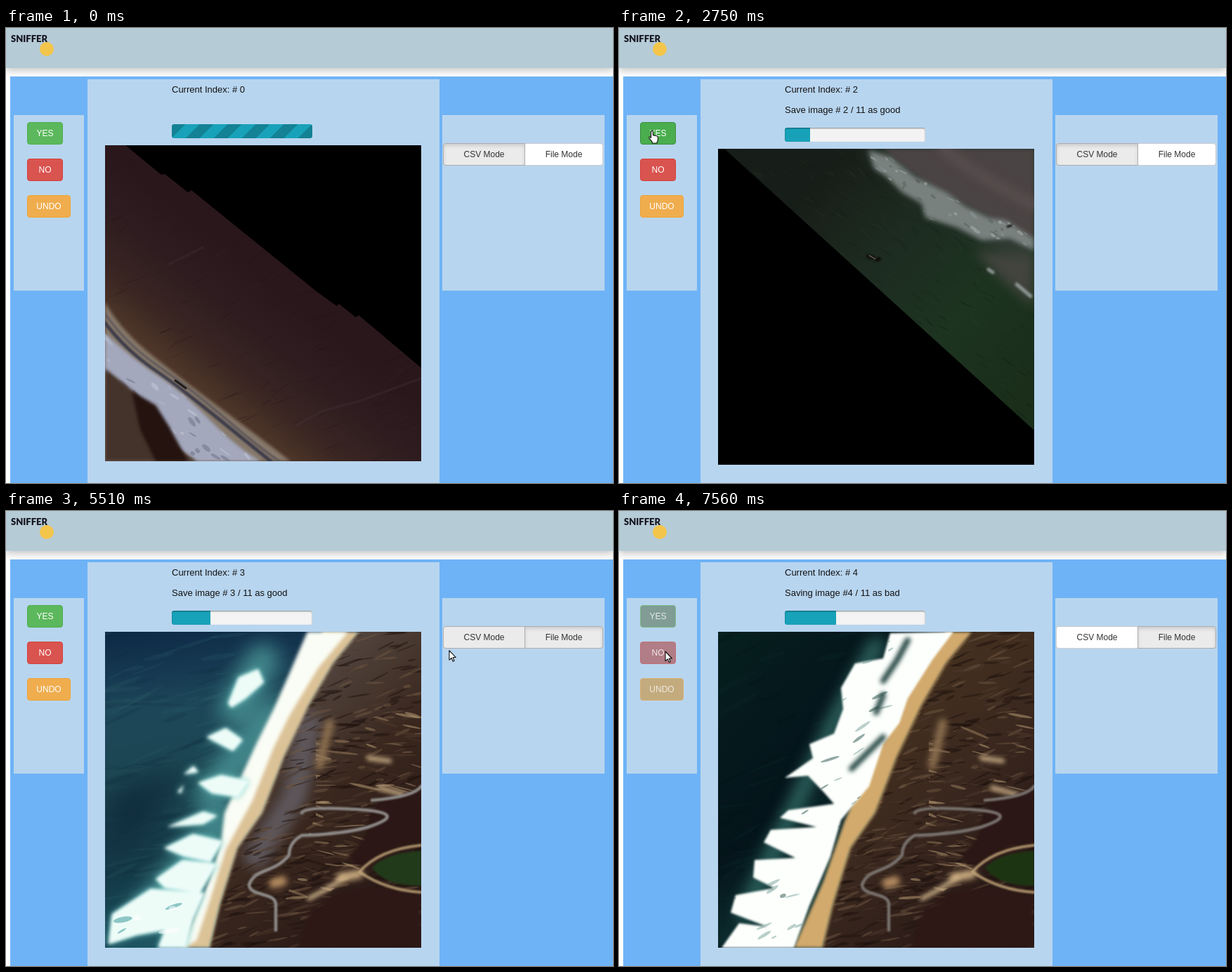
Animation of 864x648 px, one loop 8000 ms. Source, as an HTML page with a canvas:

```html
<!DOCTYPE html>
<html lang="en">
<head>
<meta charset="utf-8">
<title>Image sorting</title>
<style>
  html, body { margin: 0; width: 100%; height: 100%; overflow: hidden; background: #fff; }
  body { font: 13px/18px "Liberation Sans", Arial, sans-serif; color: #111; }
  div, canvas, svg { position: absolute; box-sizing: border-box; }
  #stage { left: 0; top: 0; width: 864px; height: 648px; overflow: hidden; background: #fff; }
  #head { left: 0; top: 0; width: 864px; height: 57px; background: #b5cbd6; box-shadow: 0 4px 10px rgba(0,0,0,.22); }
  #mark { left: 48px; top: 20px; width: 20px; height: 20px; border-radius: 50%; background: #f3c54b; }
  #brand { left: 7px; top: 6px; font: 900 13px/18px Lato, sans-serif; color: #15151f; }
  #main { left: 6px; top: 69px; width: 858px; height: 579px; background: #6eb3f6; }
  .panel { background: #b8d5ef; }
  .btn { font-size: 12px; line-height: 30px; text-align: center; border: 1px solid; border-radius: 4px; color: #fff; height: 32px; }
  .mode { top: 164px; height: 32px; color: #333; }
  #index { left: 236px; top: 79px; white-space: pre; }
  #msg { left: 236px; top: 108px; white-space: pre; }
  #track { left: 236px; width: 200px; height: 20px; border-radius: 3px; overflow: hidden; background: #f3f3f3; }
  #fill { left: 0; top: 0; height: 20px; background-color: #18a2b9; }
  #rim { left: 0; top: 0; width: 200px; height: 20px; border-radius: 3px; }
  canvas { left: 141px; }
  #click { width: 28px; height: 28px; border-radius: 50%; background: #f2e90d; }
  #cursor { left: 0; top: 0; width: 24px; height: 24px; overflow: visible; }
</style>
</head>
<body>
<div id="stage">
  <div id="head"></div>
  <div id="mark"></div>
  <div id="brand">SNIFFER</div>
  <div id="main"></div>
  <div class="panel" style="left:10.5px;top:124px;width:100px;height:250px"></div>
  <div class="panel" style="left:116px;top:73px;width:500.5px;height:575px"></div>
  <div class="panel" style="left:621px;top:124px;width:230.5px;height:250px"></div>
  <div id="index"></div>
  <div id="msg"></div>
  <div id="track"><div id="fill"></div><div id="rim"></div></div>
  <div id="photos"></div>
  <div id="buttons"></div>
  <div id="click"></div>
  <svg id="cursor"><path id="shape" fill="#fff" stroke="#111" stroke-width="1.1" stroke-linejoin="round"/></svg>
</div>
<script>
const $ = id => document.getElementById(id);

// ---------- photos ----------
const SIZE = 450, FULL = 'M0 0H450V450H0z';

function photo(top, paint) {
  const c = document.createElement('canvas');
  c.width = c.height = SIZE;
  c.style.top = top + 'px';
  $('photos').append(c);
  const g = c.getContext('2d');
  let seed = 7;
  const rnd = () => (seed = seed * 16807 % 2147483647) / 2147483647;
  const soft = blur => g.filter = blur ? `blur(${blur}px)` : 'none';
  paint({
    fill(d, color, blur = 0) { soft(blur); g.fillStyle = color; g.fill(new Path2D(d)); },
    line(d, color, w, blur = 0) {
      soft(blur);
      g.strokeStyle = color; g.lineWidth = w; g.lineCap = g.lineJoin = 'round';
      g.stroke(new Path2D(d));
    },
    grad(x0, y0, x1, y1, ...cols) {
      const s = g.createLinearGradient(x0, y0, x1, y1);
      cols.forEach((col, i) => s.addColorStop(i / (cols.length - 1), col));
      return s;
    },
    // random flecks w by h, turned by a, inside the path d
    flecks(d, n, cols, w, h, a, alpha) {
      soft(0);
      g.save(); g.clip(new Path2D(d)); g.globalAlpha = alpha;
      for (let i = 0; i < n; i++) {
        g.fillStyle = cols[i % cols.length];
        g.beginPath();
        g.ellipse(rnd() * SIZE, rnd() * SIZE, w * (.4 + rnd()), h * (.4 + rnd()), a + (rnd() - .5) * .5, 0, 7);
        g.fill();
      }
      g.restore();
    }
  });
  return c;
}

function saltShore({ fill, line, grad, flecks }) {
  fill(FULL, grad(110, 350, 235, 195, '#553c2b', '#3a2622', '#2e1c20', '#2a171b'));
  flecks(FULL, 260, ['#3a282c', '#231217'], 14, .6, -.5, .3);
  line('M270 400L310 378 360 365 450 332M90 170L140 145', '#453b45', 1, 1);
  fill('M0 223Q20 262 69 301T169 378 264 450H0z', '#86786a', 2);
  line('M0 240Q30 283 75 314T170 388 248 450', '#5d575a', 3, 1);
  line('M0 253Q30 292 69 319T162 390 236 450', '#3d3c4a', 5, 1);
  line('M100 335L115 346', '#211b1b', 3);
  const salt = 'M0 268Q40 305 75 328T150 392 222 450H130L85 420 75 392 40 354 0 322z';
  fill(salt, '#a3a8bd', 2);
  flecks(salt, 500, ['#6c7087', '#c4c9da', '#b4b9cc'], 8, 2.5, .7, .5);
  fill('M0 318L40 350 75 392 85 420 130 450H0z', '#44332b', 2);
  fill('M38 350L72 370 92 402 118 450H72L50 405z', '#24130f', 2);
  fill('M29 0L80 42 85 41 118 67 123 64 150 86 302 209 330 229 333 226 357 245 361 242 450 317V0z', '#000');
}

function creek({ fill, line, grad, flecks }) {
  fill(FULL, grad(0, 100, 450, 350, '#4f3738', '#52383a', '#573b3a'));
  flecks(FULL, 4200, ['#38262a', '#6b4b49', '#45322c', '#74544f'], 3.4, 2, .3, .4);
  const stem = 'M72 114Q78 122 112 128C140 142 165 160 185 178C207 200 208 220 202 240Q190 280 165 310';
  const east = 'M195 262C235 225 270 222 310 232S370 275 450 267';
  const north = 'M327 228C345 200 338 170 358 150C374 125 368 105 358 92Q400 80 406 40';
  const thin = 'M112 0Q115 25 121 50M95 72C70 90 66 105 72 114M205 186Q220 165 242 162M335 222Q360 195 382 190';
  for (const d of [stem, east, north, thin]) line(d, 'rgba(70,58,36,.45)', 34, 8);
  line(thin, '#77748a', 4, 1);
  line(stem, '#716d87', 9, 1);
  line(north, '#8990a0', 8, 1.5);
  line('M400 65Q406 55 406 40', '#52413b', 6, 1);
  fill('M86 66L108 48 130 46 134 57 112 76 92 79z', '#8c929f', 1);
  fill('M150 300C175 260 190 245 190 185L212 180Q215 205 222 216C255 205 290 210 318 222L345 195 352 202 342 230C370 258 410 262 450 259V277C405 292 370 285 338 267C310 240 255 240 220 265Q195 282 192 328z', '#736c80', 1.5);
  line('M180 250Q200 220 200 192M225 222Q265 212 300 222', '#515885', 5, 3);
  line('M310 232C345 240 365 275 450 267', '#a0aab2', 6, 3);
  fill('M0 185L17 198 65 236 149 300 190 328 299 401 306 399 374 450H0z', '#000');
}

function surf({ fill, line, grad, flecks }) {
  fill(FULL, grad(120, 60, 430, 350, '#171d18', '#1d2b20', '#1d3420', '#1a2e1a'));
  flecks(FULL, 700, ['#2b3d2e', '#121c13'], 9, .8, .6, .3);
  fill('M205 0Q240 45 300 88T450 165V0z', '#303b34', 8);
  fill('M235 0C290 50 350 80 450 130V0z', '#4b4444', 3);
  line('M320 0Q370 40 450 80', '#574c4d', 16, 6);
  fill('M365 145L450 150V225Q410 195 365 145z', '#42443d', 8);
  const foam = 'M214 2L245 12 280 40 325 62 352 82 385 98 410 102 450 128V145L415 128 375 130 340 112 295 98 290 78 262 62 240 40 222 28z';
  fill(foam, '#79817f', 3);
  flecks(foam, 1000, ['#a6afae', '#59615e', '#8f9897'], 5, 2, .6, .55);
  line('M425 193L445 210M385 172L391 176', '#8b9492', 5, 1.5);
  line('M214 153L220 155M226 158L229 157', '#100f0d', 6, 1);
  line('M215 152L224 157', '#59564a', 1.5);
  line('M412 111L418 109', '#161817', 3, 1);
  fill('M0 0H9L450 401V450H0z', '#000');
}

const LAND = 'M362 0L325 45 290 105 255 178 224 258 189 308 164 388 149 450H450V0z';

function land({ fill, line, grad, flecks }, dark) {
  fill(LAND, grad(260, 100, 450, 300, dark ? '#44301f' : '#51443d', '#3a281f', '#2b1b17'));
  if (!dark) line('M290 130L270 235 215 320', '#5d565a', 34, 8);
  flecks(LAND, 900, ['#20140f', '#6e5640', '#4c392c', '#1c110e'], 13, 1.8, -.25, .5);
  const ridge = 'M300 135L450 110V225L400 250 420 275 350 350 290 390 250 400 300 260z';
  flecks(ridge, 480, ['#9b8060', '#20130e', '#c0a37b', '#4e382a'], 17, 1.8, .15, .5);
  line('M375 180L405 184M390 222L425 232M340 350Q320 365 290 380', '#cdb28a', 6, 3);
  line('M320 130L305 190', '#907352', 12, 5);
  fill('M392 240Q425 238 450 218V300Q400 305 365 335L345 320Q380 290 375 262z', '#2b1715', 2);
  fill('M330 372Q390 355 450 375V450H275L290 400z', '#2d1816', 3);
  line('M450 304Q390 310 362 342Q400 368 450 371', '#a58a66', 4, 1);
  fill('M450 312Q400 315 380 336Q398 362 450 362z', dark ? '#1d3413' : '#213a1a', 1);
  line('M335 350L362 345', '#cfb083', 12, 4);
  line('M240 358L252 355', '#b78e62', 14, 4);
  line('M450 220Q440 235 380 240M280 258Q285 248 360 253T375 278Q340 288 280 290Q262 300 262 318C240 345 215 335 205 360C205 378 245 370 243 390V425',
    dark ? '#77706c' : '#8c8987', 4.5, 1);
  flecks('M185 385H260V450H165z', 60, ['#8e8888'], 3, 3, 0, .6);
}

function brightCoast(pen) {
  const { fill, line, grad, flecks } = pen;
  fill(FULL, grad(30, 0, 90, 450, '#0d2947', '#1d4658', '#1d4852', '#143947', '#1d5662'));
  flecks(FULL, 320, ['#2b5a66', '#0e2f42'], 34, 3, -.25, .22);
  fill('M0 225L120 190 60 290 0 330z', '#102d3d', 20);
  line('M225 40L185 110M240 120L150 230M165 270L60 400', '#43898d', 45, 14);
  land(pen, false);
  fill('M310 0H362L325 45 290 105 255 178 224 258 189 308 164 388 149 450H110L145 370 175 280 240 130z', '#dcc297', 2);
  fill('M288 0H346L303 52 262 120 240 165 210 240 172 310 150 380 130 440 112 450 130 400 150 350 165 300 170 258 185 225 215 160 240 110 262 60z', '#fafdf5', 2.5);
  const blobs = 'M175 102L190 65 218 53 226 72 200 95 180 108zM144 150L172 137 196 154 182 170zM132 215L165 204 205 212 190 236 152 230z' +
    'M103 228L112 218 108 230zM112 203L126 191 133 200zM88 278L140 256 160 262 140 274zM84 308L125 288 168 298 150 328 112 320z' +
    'M72 352L110 325 160 330 135 372 85 365zM10 402L65 366 142 372 125 410 115 450H75L85 425 45 432 5 445z';
  fill(blobs, '#7fd3d0', 5);
  fill(blobs, '#eefcf8', 2);
  flecks('M5 400L65 366 142 372 115 450H5z', 70, ['#4ea5a6', '#fff'], 11, 3, -.3, .6);
}

function darkCoast(pen) {
  const { fill, line, grad, flecks } = pen;
  fill(FULL, grad(0, 0, 250, 260, '#06201f', '#05191d', '#04141a', '#0f3435'));
  flecks(FULL, 160, ['#0b2929', '#031016'], 30, 3, -.35, .25);
  line('M225 20L165 130 90 290 40 400', '#2c605c', 24, 10);
  land(pen, true);
  fill('M325 0H362L325 45 290 105 255 178 224 258 189 308 164 388 149 450H108L150 355 180 270 240 130z', '#d3aa6d', 2);
  const foam = 'M245 2L335 0 305 40 270 95 258 130 235 160 215 220 175 268 160 320 130 390 108 450H5L30 415 70 420 18 400 25 375 80 365 50 350 52 325 110 322 65 300 75 282 140 278 88 265 100 254 165 245 150 228 128 205 95 208 135 180 130 160 165 145 178 110 175 80 195 45 235 38z';
  fill(foam, '#fcfffc', 1.5);
  flecks(foam, 130, ['#28524f', '#7aa19c'], 10, 2, -.4, .5);
  line('M270 12L255 40 235 70M235 90L225 115M190 195L235 150', '#21423f', 8, 3);
}

const photos = [photo(167, saltShore), photo(172, creek), photo(172, surf), photo(172, brightCoast), photo(172, darkCoast)];

// ---------- buttons: colours are [fill, border, text] ----------
function button(text, x, y, w, idle, hover, off, mode) {
  const el = document.createElement('div');
  el.className = mode ? 'btn mode' : 'btn';
  el.textContent = text;
  Object.assign(el.style, { left: x + 'px', top: y + 'px', width: w + 'px' });
  $('buttons').append(el);
  return { el, x, y, w, idle, hover, off };
}
const votes = [
  button('YES', 30, 134, 51, ['#5cb85c', '#4cae4c', '#fff'], ['#4aad4e', '#398f3c', '#fff'], ['#809c95', '#7cba87', '#e6eaea']),
  button('NO', 30, 186, 51, ['#d9534f', '#d43f3a', '#fff'], ['#d43d39', '#b52f2b', '#fff'], ['#b17d86', '#c06f75', '#efe4e6']),
  button('UNDO', 30, 238, 62, ['#f0ad4e', '#eea236', '#fff'], ['#ec9c2f', '#d58512', '#fff'], ['#c3ab7e', '#d9b070', '#efe9e0'])
];
const plain = ['#fff', '#ccc', '#333'], grey = ['#ebebeb', '#adadad', '#333'];
const modes = [
  button('CSV Mode', 622, 164, 117, plain, grey, plain, true),
  button('File Mode', 738, 164, 112, plain, grey, plain, true)
];
modes[0].el.style.borderRadius = '4px 0 0 4px';
modes[1].el.style.borderRadius = '0 4px 4px 0';

function tint({ el }, [fill, border, text]) {
  el.style.background = fill;
  el.style.borderColor = border;
  el.style.color = text;
}

// ---------- timeline ----------
const LOOP = 8000, TICK = 66.8;
const good = n => `Save image # ${n} / 11 as good`;
const saving = n => `Saving image #${n} / 11 as bad`;

// time, index, message, photo, buttons off, active mode
const steps = [
  [0, 0, '', 0, false, 0],
  [1620, 1, '', 0, false, 0],
  [1880, 1, good(1), 1, false, 0],
  [2750, 2, good(2), 2, false, 0],
  [4030, 3, good(3), 3, false, 0],
  [5250, 3, good(3), 3, false, 1],
  [6430, 3, saving(3), 3, true, 1],
  [6890, 4, 'Successfully saved image # 4 as bad', 4, false, 1],
  [7560, 4, saving(4), 4, true, 1]
];
// time, x, y of the pointer tip
const path = [
  [70, 778, 622], [300, 640, 520], [600, 340, 330], [860, 181, 255], [930, 125, 248], [1000, 88, 205],
  [1069, 68, 161], [1140, 58, 151], [1330, 47, 146], [4400, 47, 146], [4480, 110, 147], [4560, 330, 153],
  [4676, 649, 167], [4830, 705, 177], [4960, 740, 182], [5250, 742, 184], [5500, 620, 200], [5800, 200, 207],
  [6010, 72, 205], [6150, 66, 200]
];
const clicks = [[1410, 210], [2540, 210], [3810, 220], [5040, 210], [6150, 200], [7420, 140]];

const HAND = 'M-1.4 1.6Q-1.3 .4 0 .4T1.3 1.6V6.6L6.6 7.7Q8.4 8.2 8.4 10V13Q8.4 15 7.2 16.2V18H.2V16.2L-4 10.8Q-4.8 9.3-3.2 8.8L-1.4 10.4z';
const ARROW = 'M0 0V13.6L3.2 10.8 5.3 15.6 7.2 14.8 5.2 10H9.4z';

function tipAt(t) {
  t = Math.floor(t / TICK + 1e-6) * TICK;
  const i = path.findIndex(p => p[0] > t);
  if (i < 0) return path[path.length - 1].slice(1);
  if (i === 0) return path[0].slice(1);
  const [t0, x0, y0] = path[i - 1], [t1, x1, y1] = path[i], k = (t - t0) / (t1 - t0);
  return [x0 + (x1 - x0) * k, y0 + (y1 - y0) * k];
}
const over = (b, [x, y]) => x >= b.x && x < b.x + b.w && y >= b.y && y < b.y + 32;

function render(t) {
  const [, index, msg, pic, off, mode] = steps.filter(s => s[0] <= t).pop();
  $('index').textContent = 'Current Index: # ' + index;
  $('msg').textContent = msg;
  photos.forEach((c, i) => c.style.visibility = i === pic ? 'visible' : 'hidden');

  const busy = pic === 0, bar = $('fill').style;
  $('track').style.top = (busy ? 137 : 142) + 'px';
  $('rim').style.boxShadow = busy ? 'none' : 'inset 0 1px 2px rgba(0,0,0,.45)';
  bar.width = (busy ? 200 : 200 * pic / 11) + 'px';
  const shift = 40 - Math.floor(Math.min(t, 1620) / TICK) * TICK / 50;
  bar.background = busy
    ? `repeating-linear-gradient(135deg, #138294 0 14.14px, #18a2b9 14.14px 28.28px) ${shift - 80}px 0 / 400px 20px`
    : '#18a2b9';

  // hover colours trail the pointer by one tick
  const tip = tipAt(t), late = tipAt(t - TICK);
  votes.forEach(b => tint(b, off ? b.off : over(b, late) ? b.hover : b.idle));
  modes.forEach((b, i) => {
    tint(b, i === mode || over(b, late) ? b.hover : b.idle);
    b.el.style.boxShadow = i === mode ? 'inset 0 3px 5px rgba(0,0,0,.125)' : 'none';
    b.el.style.zIndex = i === mode ? 1 : 0;
  });

  const hit = clicks.find(([s, d]) => t >= s && t < s + d), ring = $('click').style;
  ring.visibility = hit ? 'visible' : 'hidden';
  if (hit) {
    const n = Math.floor((t - hit[0]) / 70);
    ring.opacity = .65 - .2 * n;
    ring.transform = `translate(${tip[0] - 15}px, ${tip[1] - 11}px) scale(${.75 + .12 * n})`;
  }

  const hand = modes.some(b => over(b, tip)) || !off && votes.some(b => over(b, tip));
  $('cursor').style.visibility = t < 70 ? 'hidden' : 'visible';
  $('cursor').style.transform = `translate(${tip[0]}px, ${tip[1]}px)`;
  $('shape').setAttribute('d', hand ? HAND : ARROW);
}

const start = performance.now();
function loop() {
  render((performance.now() - start) % LOOP);
  requestAnimationFrame(loop);
}
loop();
</script>
</body>
</html>
```
